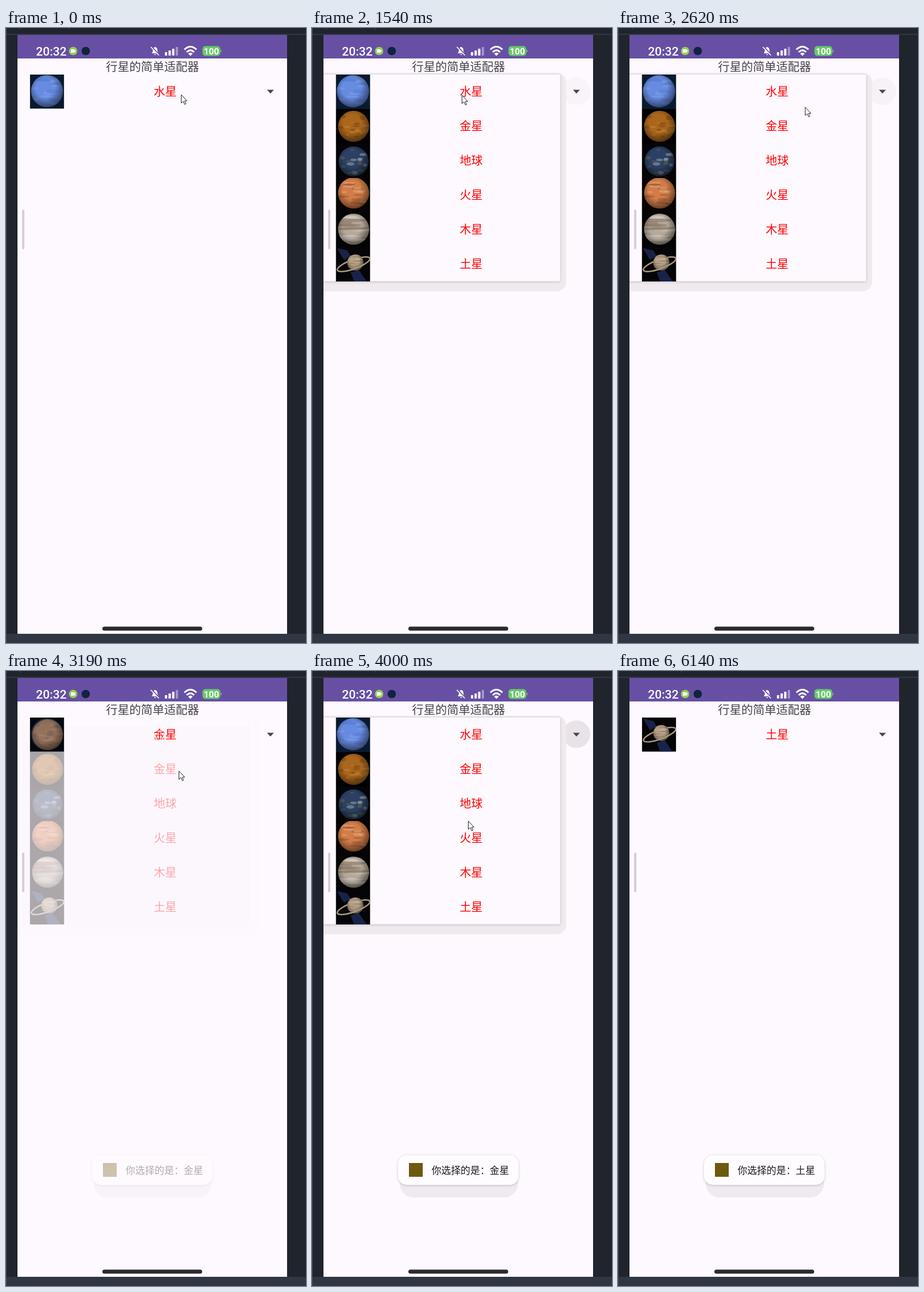
Write an HTML page that moves like this. It is 523x1070 px and loops after 6.16 s.

```html
<!DOCTYPE html>
<html lang="zh-CN">
<head>
<meta charset="utf-8">
<title>行星的简单适配器</title>
<style>
  html, body { margin: 0; width: 100%; height: 100%; overflow: hidden; background: #20242c; }
  svg { display: block; }
  text { font-family: "Noto Sans CJK SC", "Noto Sans", sans-serif; text-anchor: middle; }
  .latin { font-family: Roboto, sans-serif; font-weight: 500; fill: #fff; }
  .name { font-size: 20px; fill: #f00; }
  .raised { filter: drop-shadow(0 1px 2px #0003); }
</style>
</head>
<body>
<svg width="523" height="1070" viewBox="0 0 523 1070">
  <defs>
    <clipPath id="screen"><path d="M20 12H490V1054H20z"/></clipPath>
    <radialGradient id="shade" cx=".45" cy=".4" r=".6">
      <stop offset=".5" stop-opacity="0"/><stop offset="1" stop-opacity=".5"/>
    </radialGradient>
    <g id="planets"></g>
  </defs>

  <path fill="#20242c" d="M0 0H523V1070H0z"/>
  <path fill="#303642" d="M0 1054H523V1070H0zM0 10H523V12H0zM24 0h2v3h-2zM109 0h2v3h-2z"/>
  <path d="M.5 0V1070" stroke="#4a4e57"/>

  <g clip-path="url(#screen)">
    <path fill="#fef9fe" d="M20 12H490V1054H20z"/>
    <path fill="#6750a4" d="M20 12H490V53H20z"/>
    <text class="latin" x="79" y="47.5" font-size="21">20:32</text>
    <circle cx="117" cy="40" r="7.3" fill="#92d050"/>
    <path fill="#fff" d="M113 37h6v1.5l2-1v5l-2-1V43h-6z"/>
    <circle cx="139" cy="40" r="7.3" fill="#10233f"/>
    <g fill="#fff">
      <path d="M254 44q2-2 2-5 0-5 4-6 4 1 4 6 0 3 2 5zM258 45.5h4q-2 3-4 0z"/>
      <path d="M253 32l14 15" stroke="#6750a4" stroke-width="3"/>
      <path d="M252.5 33l14 14.5" stroke="#fff" stroke-width="1.6"/>
      <g id="signal"></g>
      <path d="M311 37.5Q321.5 27.5 332 37.5M315 42Q321.500 35.500 328 42" fill="none" stroke="#fff" stroke-width="3"/>
      <path d="M317.5 44.5q4-3.5 8 0l-4 4z"/>
    </g>
    <rect x="342.5" y="31.5" width="31" height="17" rx="5" fill="#68c968"/>
    <path d="M375 38v4" stroke="#68c968" stroke-width="1.5"/>
    <text class="latin" x="358" y="45.5" font-size="15.5" style="font-weight:700">100</text>

    <text x="255.5" y="74.5" font-size="20.3" fill="#45424a">行星的简单适配器</text>
    <use id="photo" x="41.5" y="81" width="60" height="59.5"/>
    <text id="chosen" class="name" x="277.5" y="117.7"></text>
    <circle id="ripple" cx="461" cy="110" r="24" fill="#e9e3e9"/>
    <path fill="#49454b" d="M455 107.5h12l-6 6.5z"/>

    <g id="popup">
      <g id="halo">
        <rect x="0" y="78" width="443" height="380" rx="16" fill="#f0eaef"/>
        <rect class="raised" x="18" y="81" width="414.5" height="359.5" rx="2" fill="#e0dae0"/>
      </g>
      <rect x="18" y="81" width="414.5" height="359.5" rx="2" fill="#fef9fe"/>
      <rect id="veil" x="28" y="96" width="400" height="344" rx="3" fill="#cbc6ca"/>
      <g id="rows"></g>
    </g>

    <g id="toast">
      <rect x="153" y="860" width="206" height="56" rx="24" fill="#f0eaf0"/>
      <rect class="raised" x="150" y="842.5" width="210" height="51.5" rx="15" fill="#fefcff"/>
      <path fill="#6e5911" d="M169 856h24v24h-24z"/>
      <text id="message" x="276" y="874.7" font-size="16.9" fill="#1b191c"></text>
    </g>
    <rect x="28" y="316" width="4" height="69" rx="2" fill="#d5ced6"/>
    <rect x="168" y="1041.5" width="174" height="7" rx="3.5" fill="#2c2930"/>
  </g>
  <path id="cursor" d="M.5 0V14.5L4 11.5 6.5 17 8.5 16 6.3 10.8H10.5z" fill="#fff" stroke="#222"/>
</svg>
<script>
const $ = id => document.getElementById(id);
const LOOP = 6160, START = 690, TICK = (LOOP - START) / 40;

const planets = [
  { name: '水星', sky: '#0a1a2e', disc: '#678be0', marks: ['#7c9dea', '#587dd4'], x: 30, y: 29, r: 28, stretch: 2 },
  { name: '金星', sky: '#000', disc: '#a9661c', marks: ['#c5842f', '#824b13'], x: 31, y: 30, r: 27, stretch: 1 },
  { name: '地球', sky: '#050507', disc: '#2b4062', marks: ['#8d99a3', '#5f5a50'], x: 31, y: 31, r: 26, stretch: 1 },
  { name: '火星', sky: '#070403', disc: '#d27d49', marks: ['#e6a373', '#a35b36'], x: 31, y: 26, r: 27, stretch: 1.5 },
  { name: '木星', sky: '#050404', disc: '#b5a999', marks: ['#d6cdc3', '#8c7a6a'], x: 31, y: 29, r: 27, stretch: 5 },
  { name: '土星', sky: '#050507', disc: '#b49d82', marks: ['#c8b49a', '#95806a'], x: 34, y: 27, r: 14, stretch: 5, ring: true },
];

let seed = 3;
const random = () => (seed = seed * 16807 % 2147483647) / 2147483647;

function blotch({ x, y, r, marks, stretch }, i) {
  const across = () => r * (random() * 1.7 - .85);
  return `<ellipse cx="${x + across()}" cy="${y + across()}" rx="${r * stretch * (.12 + .15 * random())}"
    ry="${r * (.05 + .08 * random())}" fill="${marks[i % 2]}" opacity=".6"/>`;
}

function drawPlanet(p, i) {
  const circle = fill => `<circle cx="${p.x}" cy="${p.y}" r="${p.r}" fill="${fill}"/>`;
  const clouds = '<path fill="#18234a" d="M2 2L20 6 26 16 14 22zM26 44L40 40 54 60H32z"/>';
  const ring = arc => `<path d="M1 30a30 8 0 0 ${arc} 60 0" transform="rotate(-20 31 30)"
    fill="none" stroke="#a9987f" stroke-width="2.5"/>`;
  return `<clipPath id="disc${i}">${circle('#000')}</clipPath>
    <symbol id="p${i}" viewBox="0 0 60 60">
      <path fill="${p.sky}" d="M0 0H60V60H0z"/>${p.ring ? clouds + ring(1) : ''}
      ${circle(p.disc)}
      <g clip-path="url(#disc${i})">${Array.from({ length: 16 }, (_, k) => blotch(p, k)).join('')}</g>
      ${circle('url(#shade)')}${p.ring ? ring(0) : ''}
    </symbol>`;
}

$('planets').innerHTML = planets.map(drawPlanet).join('');
$('rows').innerHTML = planets.map((p, i) =>
  `<use href="#p${i}" x="41.5" y="${81 + 60 * i}" width="60" height="60"/>
   <text class="name" x="277.5" y="${117.7 + 60 * i}">${p.name}</text>`).join('');
$('signal').innerHTML = [0, 1, 2, 3].map(i =>
  `<rect x="${277 + 6.3 * i}" y="${42 - 3 * i}" width="4" height="${6 + 3 * i}" rx="1" opacity="${i < 3 ? 1 : .4}"/>`).join('');

// Each round: press the arrow, then pick a planet from the list.
const rounds = [
  { press: 960, pick: 1700, planet: 0 },
  { press: 2080, pick: 2950, planet: 1 },
  { press: 3620, pick: 4952, planet: 5 },
];
const SELECT_DELAY = 100, TOAST_SWAP = 5400;
const stops = [[690, 305, 116], [1510, 261, 117], [2194, 342, 114], [3151, 301, 174],
               [3620, 310, 118], [3972, 272, 261], [5066, 290, 415], [6100, 300, 1031]];

const ramp = (elapsed, duration) => Math.min(1, Math.max(0, elapsed / duration));
const pulse = (t, on, rise, off, fall) => ramp(t - on, rise) - ramp(t - off, fall);
const strongest = shape => Math.max(...rounds.map(shape));

function cursorAt(t) {
  const next = stops.findIndex(s => s[0] > t);
  if (next < 1) return stops.at(next).slice(1);
  const [from, to] = [stops[next - 1], stops[next]];
  const u = ramp(t - from[0], to[0] - from[0]);
  const eased = u * u * (3 - 2 * u);
  return [1, 2].map(k => from[k] + (to[k] - from[k]) * eased);
}

function draw(now) {
  // The screen refreshes in steps of one tick.
  const t = START + Math.floor((now % LOOP - START + 40) / TICK) * TICK;
  const open = strongest(r => pulse(t, r.press + 150, 150, r.pick, 300));
  const { planet } = rounds.findLast(r => t >= r.pick + SELECT_DELAY) || rounds[0];

  $('photo').setAttribute('href', '#p' + planet);
  $('chosen').textContent = planets[planet].name;
  $('popup').style.opacity = open;
  $('halo').style.opacity = open * open;
  $('veil').style.opacity = open < 1 ? open * open : 0;
  $('ripple').style.opacity = strongest(r => pulse(t, r.press, 150, r.press + 400, 200));
  $('toast').style.opacity = Math.min(ramp(t - rounds[1].pick - SELECT_DELAY, 300), ramp(Math.abs(t - TOAST_SWAP), 220));
  $('message').textContent = '你选择的是：' + planets[rounds[t < TOAST_SWAP ? 1 : 2].planet].name;
  $('cursor').style.opacity = t < stops.at(-1)[0] ? 1 : 0;
  $('cursor').setAttribute('transform', `translate(${cursorAt(t)})`);
  requestAnimationFrame(draw);
}
requestAnimationFrame(draw);
</script>
</body>
</html>
```
